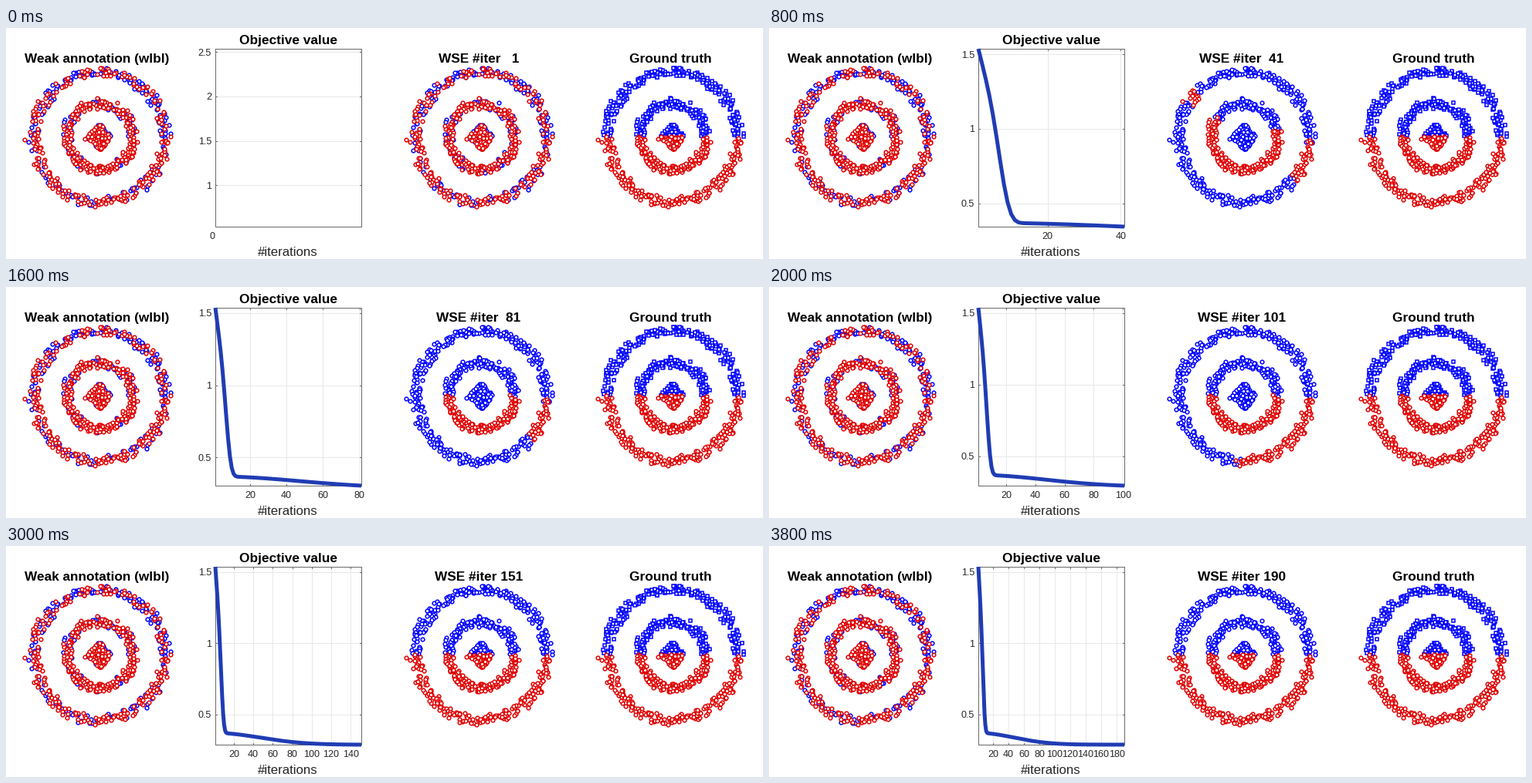
A matplotlib script that plays this animation: 980x300 px, repeating every 4.8 s.

```python
import numpy as np
import matplotlib.pyplot as plt
from matplotlib.animation import FuncAnimation

W, H, DPI = 980, 300, 100
PX = 72 / DPI
BLUE, RED, INK, EDGE = "#0000ff", "#e00000", "#262626", "#6a6a6a"
LEFT, RIGHT, TOP, BOTTOM = 271, 460, 27, 258
CX, CY = 121, 141
SHIFT_WSE, SHIFT_TRUTH = 494, 742

fig = plt.figure(figsize=(W / DPI, H / DPI), dpi=DPI, facecolor="white")
ax = fig.add_axes([0, 0, 1, 1])
ax.set_xlim(0, W)
ax.set_ylim(H, 0)
ax.axis("off")


def label(x, y, text, size, ha="center", va="baseline", bold=False):
    return ax.text(x, y, text, fontsize=size * PX, ha=ha, va=va,
                   family="Liberation Sans",
                   weight="bold" if bold else "normal",
                   color="black" if bold else INK)


def ramp(it, start, end):
    return np.clip((it - start) / (end - start), 0, 1)


# Point cloud: two noisy rings and a diamond, offsets with y up
rng = np.random.default_rng(11)


def ring(n, radius, spread):
    a = np.arange(n) * 2 * np.pi / n + rng.normal(0, 0.05, n)
    r = radius + np.clip(rng.normal(0, spread, n), -2 * spread, 2 * spread)
    return r * np.cos(a), r * np.sin(a)


outer = ring(420, 84.5, 3.7)
middle = ring(310, 43, 3.4)
u, v = rng.uniform(-1, 1, (2, 120))
dx = np.concatenate([outer[0], middle[0], (u + v) * 8.5, [-97, -19]])
dy = np.concatenate([outer[1], middle[1], (u - v) * 9, [-4, -3]])
total = len(dx)
radius = np.hypot(dx, dy)
angle = np.degrees(np.arctan2(dy, dx))
is_outer, is_inner = radius > 65, radius < 26
is_middle = ~is_outer & ~is_inner
truth_blue = dy > 0

p_blue = np.where(truth_blue, 0.55, 0.28) - 0.12 * is_middle - 0.2 * is_inner
weak_blue = rng.random(total) < p_blue
start_blue = weak_blue ^ (rng.random(total) < 0.1)
settled = rng.random(total) < 0.7
wobble = rng.normal(0, 2, total)


def red_arcs(it):
    """Ring mask with start and end angle of each red stretch."""
    half_left = 15 * (1 - ramp(it, 21, 56))
    half_top = 14 * (1 - ramp(it, 21, 41))
    sweep = ramp(it, 81, 131)
    close = ramp(it, 21, 61)
    yield is_outer, 142 - half_left, 142 + half_left
    yield is_outer, 85 - half_top, 85 + half_top
    yield is_outer, -40 - 140 * sweep, 8 - 12 * ramp(it, 21, 41) + 4 * sweep
    yield is_middle, 114 + 66 * close, 384 - 24 * close


def predicted_blue(it):
    if it == 1:
        return start_blue
    blue = np.ones(total, bool)
    turned = angle + wobble * (1 - ramp(it, 121, 131))
    for mask, a, b in red_arcs(it):
        blue &= ~(mask & ((turned - a) % 360 < b - a))
    tilt = 0.25 * (1 - ramp(it, 21, 41))
    level = -25 * ramp(it, 21, 41) * (1 - ramp(it, 91, 135))
    blue[is_inner] = (dy > tilt * dx + level)[is_inner]
    return np.where(settled, blue, start_blue) if it < 21 else blue


def marks(color, shape="o"):
    return ax.plot([], [], shape, ms=4.7 * PX, mew=1.5 * PX,
                   mec=color, mfc="white")[0]


def place(pair, blue, shift):
    for line, mask in zip(pair, (blue, ~blue)):
        line.set_data(CX + shift + dx[mask], CY - dy[mask])


weak = marks(BLUE), marks(RED)
wse = marks(BLUE), marks(RED)
truth = marks(BLUE, "s"), marks(RED)
place(weak, weak_blue, 0)
place(truth, truth_blue, SHIFT_TRUTH)

label(118, 45, "Weak annotation (wlbl)", 17.3, bold=True)
label(365, 20.5, "Objective value", 17.3, bold=True)
label(860, 45, "Ground truth", 17.3, bold=True)
label(365, 295.5, "#iterations", 16.7)
wse_title = label(612, 45, "", 17.3, bold=True)

# Objective: a steep early drop on a slowly fading tail
iters = np.arange(1, 191)
values = (0.287 + 0.083 * np.exp(-(iters / 66) ** 2)
          + 1.27 * np.exp(-0.085 * iters - 2.2e-4 * iters ** 4.0))

grid, = ax.plot([], [], color="#e8e8e8", lw=PX, zorder=1)
ticks, = ax.plot([], [], color=EDGE, lw=PX, zorder=2)
ax.plot([LEFT, RIGHT, RIGHT, LEFT, LEFT], [TOP, TOP, BOTTOM, BOTTOM, TOP],
        color=EDGE, lw=PX, zorder=2)
curve, = ax.plot([], [], color="#203cb4", lw=5 * PX, zorder=3,
                 solid_capstyle="butt", solid_joinstyle="round")
x_labels = [label(0, 270, "", 12.5, va="center_baseline") for _ in range(9)]
y_labels = [label(266, 0, "", 12.5, ha="right", va="center_baseline")
            for _ in range(4)]


def segments(line, parts):
    xs, ys = [], []
    for x0, y0, x1, y1 in parts:
        xs += [x0, x1, np.nan]
        ys += [y0, y1, np.nan]
    line.set_data(xs, ys)


def fill(texts, items, axis):
    for t in texts:
        t.set_text("")
    for t, (pos, value) in zip(texts, items):
        t.set_text(f"{value:g}")
        t.set(**{axis: pos})


def draw_plot(it):
    first, last = values[0], values[it - 1]
    low, high = (last, first) if it > 1 else (first - 1, first + 1)

    def to_x(i):
        return LEFT + (i - 1) / max(it - 1, 1) * (RIGHT - LEFT)

    def to_y(val):
        return TOP + (high - val) / (high - low) * (BOTTOM - TOP)

    xt = [(to_x(i), i) for i in range(20, it + 1, 20)]
    yt = [(to_y(val), val) for val in np.arange(0.5, 3, 0.5)
          if low <= val <= high]
    segments(grid, [(x, TOP, x, BOTTOM) for x, _ in xt]
             + [(LEFT, y, RIGHT, y) for y, _ in yt])
    segments(ticks, [(x, e, x, e + d) for x, _ in xt
                     for e, d in ((TOP, 2), (BOTTOM, -2))]
             + [(e, y, e + d, y) for y, _ in yt
                for e, d in ((LEFT, 2), (RIGHT, -2))])
    fill(x_labels, xt if it > 1 else [(267, 0)], "x")
    fill(y_labels, yt, "y")
    n = it if it > 1 else 0
    curve.set_data(to_x(iters[:n]), to_y(values[:n]))


def update(frame):
    it = min(1 + 10 * frame, 190)
    wse_title.set_text(f"WSE #iter {it:3d}")
    place(wse, predicted_blue(it), SHIFT_WSE)
    draw_plot(it)
    return []


anim = FuncAnimation(fig, update, frames=24, interval=200,
                     init_func=lambda: update(0), repeat=True, repeat_delay=0)
plt.show()
```
